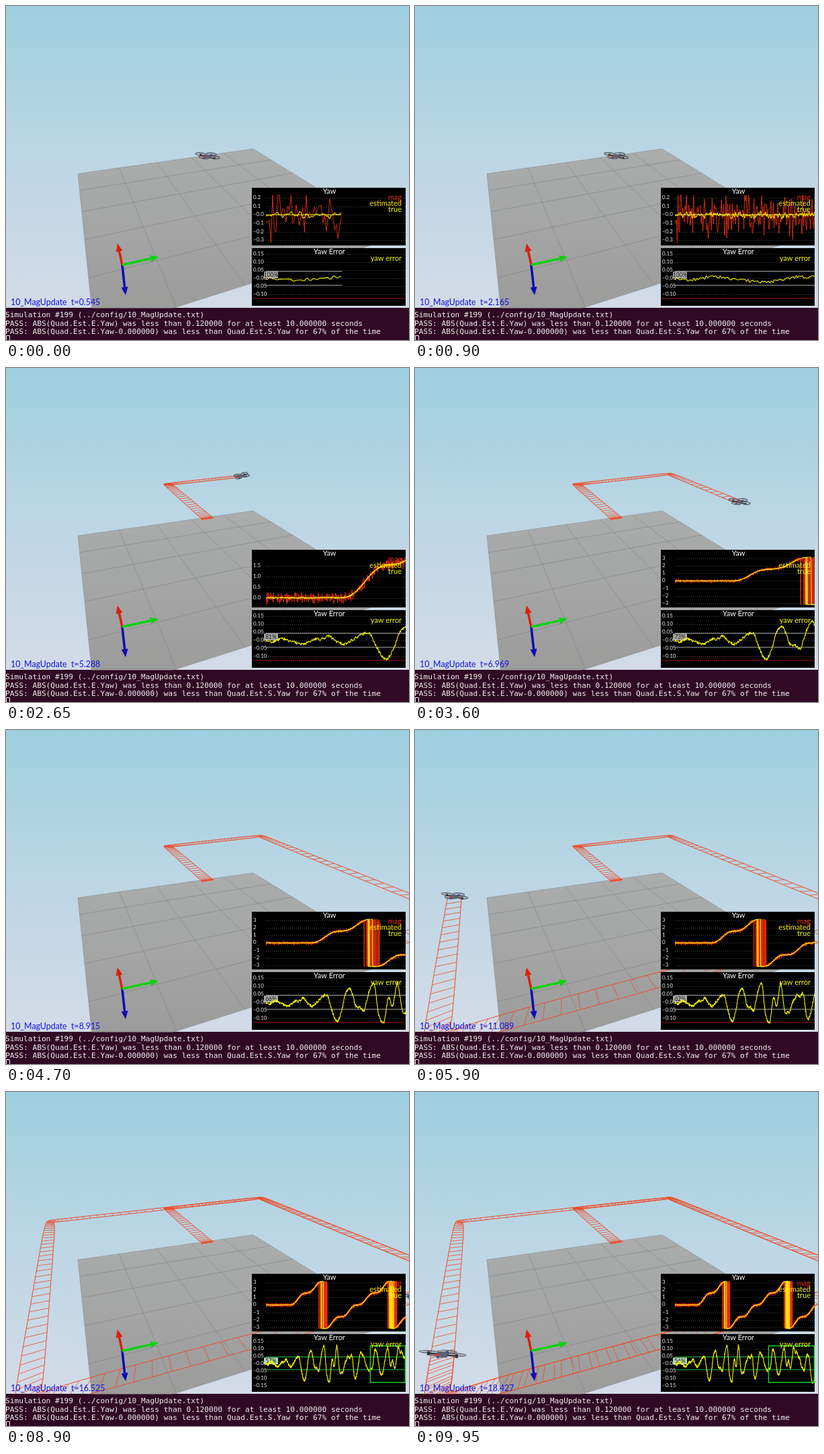
An HTML page with a canvas that plays this animation: 600x498 px, repeating every 10 s.

```html
<!DOCTYPE html>
<html lang="en">
<head>
<meta charset="utf-8">
<title>Yaw estimation simulator</title>
<style>
html, body { margin: 0; width: 100%; height: 100%; overflow: hidden; background: #300a24; }
canvas { display: block; }
</style>
</head>
<body>
<canvas id="stage" width="600" height="498"></canvas>
<script>
const ctx = document.getElementById('stage').getContext('2d');
const LOOP = 10000, STEP = 50, TAU = Math.PI * 2;
const SANS = 'Lato, "Open Sans", sans-serif';
const MONO = '"DejaVu Sans Mono", "Liberation Mono", monospace';

const clamp = p => Math.min(1, Math.max(0, p));
const smooth = p => { p = clamp(p); return p * p * (3 - 2 * p); };
const mix = (a, b, p) => a + (b - a) * p;
const rand = n => { const s = Math.sin(n * 127.1 + 11.7) * 43758.5453; return s - Math.floor(s); };
const gauss = n => (rand(n) + rand(n + .37) + rand(n + .71) - 1.5) * 2;
const wrap = a => a - TAU * Math.round(a / TAU);
const xy = (x, y) => ({ x, y });

// Simulated seconds shown at a given moment of the loop
function simTime(ms) {
  const keys = [[0, .545], [1750, 3.695], [4700, 8.915], [9950, 18.427]];
  const i = keys.findIndex((k, n) => n && ms <= k[0]);
  const [a, b] = [keys[i - 1], keys[i]];
  return mix(a[1], b[1], (ms - a[0]) / (b[0] - a[0]));
}

// Perspective plane: origin plus u and v directions over a shared depth
const plane = (o, du, dv, g, h) => (u, v) => {
  const w = 1 + g * u + h * v;
  return { x: (o[0] + du[0] * u + dv[0] * v) / w, y: (o[1] + du[1] * u + dv[1] * v) / w, w };
};
const air = plane([66, 193], [404.9, 3.3], [-54.4, -24.9], .2425, -.637);
const ground = plane([107, 250], [345.6, 12], [-45.26, -20.72], .23, -.53);

// Out from the centre to the back edge, then around the square
const MIDDLE = .505, LIFT = 2.2, EDGE = 3.5, LEAVE = 3.75, CORNER = 5.95, LEG = 2.01;
const CORNERS = [[1, 0], [1, 1], [0, 1], [0, 0]];
function route(t) {
  if (t < LEAVE) return [MIDDLE, .485 * (1 - smooth((t - LIFT) / (EDGE - LIFT)))];
  if (t < CORNER) return [mix(MIDDLE, 1, smooth((t - LEAVE) / (CORNER - LEAVE))), 0];
  const legs = (t - CORNER) / LEG, n = Math.floor(legs), p = smooth(legs - n);
  const a = CORNERS[n % 4], b = CORNERS[(n + 1) % 4];
  return [mix(a[0], b[0], p), mix(a[1], b[1], p)];
}
function place(t) {
  const near = [-.12, 0, .12].map(d => route(t + d));
  return [0, 1].map(k => near.reduce((sum, p) => sum + p[k] / 3, 0));
}

// Quarter turns with a rest after each
function yawAt(t) {
  const x = Math.max(0, (t - 2.765) / 2.018);
  return Math.PI / 2 * (x - .95 * Math.sin(TAU * x) / TAU);
}

// Wobble that grows once the turning begins
function errorAt(t) {
  const amp = .018 + .066 * smooth((t - 3.1) / 2);
  const swing = Math.cos(TAU * (t - 5.25) / 1.53);
  const n = Math.floor(t / .3), drift = mix(gauss(n + 40), gauss(n + 41), smooth(t / .3 - n));
  return amp * smooth(t / .3) * (swing + drift * .45);
}

const DT = .012, END = 18.6, SIGMA = .043;
const samples = [];
for (let i = 0; i * DT < END; i++) {
  const t = i * DT, yaw = yawAt(t);
  const err = errorAt(t) + (rand(Math.floor(i / 2) + 900) - .5) * .018;
  const noise = Math.max(-.33, Math.min(.23, gauss(i) * .13 - .01));
  samples.push({
    t, err, mag: wrap(yaw + noise), real: wrap(yaw),
    est: wrap(yaw + err * .4 + gauss(i + 5000) * .02)
  });
}

function rung(t) {
  const [u, v] = place(t), yaw = yawAt(t), half = .02;
  const du = Math.cos(yaw) * half, dv = Math.sin(yaw) * half;
  return { t, a: air(u - du, v - dv), b: air(u + du, v + dv) };
}
const rungs = [];
for (let t = 0; t < END; t += .052) rungs.push(rung(t));

function line(points, color, width = 1) {
  ctx.beginPath();
  points.forEach(p => ctx.lineTo(p.x, p.y));
  ctx.strokeStyle = color; ctx.lineWidth = width; ctx.stroke();
}
function poly(points, color) {
  ctx.beginPath();
  points.forEach(p => ctx.lineTo(p.x, p.y));
  ctx.closePath(); ctx.fillStyle = color; ctx.fill();
}
function text(str, x, y, color, size, align = 'left', family = SANS) {
  ctx.font = size + 'px ' + family;
  ctx.textAlign = align; ctx.fillStyle = color;
  ctx.fillText(str, x, y);
}
function rect(x, y, w, h, color) { ctx.fillStyle = color; ctx.fillRect(x, y, w, h); }
function fade(top, bottom, ...colors) {
  const g = ctx.createLinearGradient(0, top, 0, bottom);
  colors.forEach((c, i) => g.addColorStop(i / (colors.length - 1), c));
  return g;
}

function scenery() {
  rect(0, 0, 600, 450, fade(0, 450, '#9dcfe0', '#bcd6e4', '#d3dbe7'));
  poly([ground(0, 0), ground(1, 0), ground(1, 1), ground(0, 1)], fade(213, 450, '#abadad', '#9c9c9b'));
  for (let i = 0; i <= 5; i++) {
    const k = i / 5, shade = 'rgba(105,107,107,.35)';
    line([ground(0, k), ground(1, k)], shade);
    line([ground(k, 0), ground(k, 1)], shade);
  }
}

function trail(t) {
  const past = [...rungs.filter(r => r.t <= t), rung(t)], red = '#ee4c2a';
  line(past.map(r => r.a), red);
  line(past.map(r => r.b), red);
  past.forEach(r => line([r.a, r.b], red, .8));
}

function drone(t) {
  const p = air(...place(t)), size = 31 / p.w, yaw = yawAt(t);
  const squash = .36 * Math.min(1, p.w) - .02;
  ctx.save();
  ctx.translate(p.x, p.y);
  ctx.rotate(.1 - .28 * Math.abs(Math.sin(yaw)));
  for (let k = 0; k < 4; k++) {
    const a = yaw + .45 + k * Math.PI / 2;
    const x = Math.cos(a) * size * .31, y = Math.sin(a) * size * .31 * squash;
    line([xy(0, 0), xy(x, y)], '#34383e', Math.max(1, size * .035));
    ctx.beginPath();
    ctx.ellipse(x, y - size * .03, size * .2, size * .2 * squash, 0, 0, TAU);
    ctx.fillStyle = 'rgba(120,125,130,.35)'; ctx.fill();
    ctx.strokeStyle = 'rgba(45,48,54,.8)'; ctx.lineWidth = 1; ctx.stroke();
    rect(x - size * .03, y - size * .04, size * .06, size * .08, k % 2 ? '#3350a8' : '#303238');
  }
  rect(-size * .1, -size * .06, size * .2, size * .12, '#5a6274');
  rect(-size * .18, -size * .01, size * .14, Math.max(1, size * .03), '#c8452c');
  ctx.restore();
}

function arrow(x, y, color) {
  const o = xy(173, 386), a = Math.atan2(y - o.y, x - o.x), c = Math.cos(a), s = Math.sin(a);
  const neck = xy(x - c * 12, y - s * 12);
  line([o, neck], color, 3.5);
  poly([xy(x, y), xy(neck.x - s * 5, neck.y + c * 5), xy(neck.x + s * 5, neck.y - c * 5)], color);
}

const LEFT = 387, RIGHT = 595;
function panel(y, title, [lo, hi], step, toY) {
  const digits = step < .1 ? 2 : step < 1 ? 1 : 0;
  rect(366, y, 229, 86, '#000');
  for (let i = Math.ceil(lo / step); i <= hi / step; i++) {
    const ty = Math.round(toY(i * step)) + .5;
    ctx.setLineDash([1, 2]);
    line([xy(LEFT, ty), xy(RIGHT, ty)], '#4a4a4a');
    ctx.setLineDash([]);
    const label = (i * step - (step < .5 ? 1e-9 : 0)).toFixed(digits);
    text(label.replace('-', '\u2212'), 368, ty + 1.5, '#f2f2f2', 8);
  }
  text(title, 481.5, y + 9, '#fff', 11, 'center');
}

function plots(t) {
  const data = samples.filter(s => s.t <= t), span = Math.max(1, t);
  const toX = s => LEFT + (RIGHT - LEFT) * s / span;
  const curve = (key, toY, color, width) => line(data.map(s => xy(toX(s.t), toY(s[key]))), color, width);
  ctx.lineJoin = 'bevel';

  let lo = -.32, hi = .22;
  data.forEach(s => { lo = Math.min(lo, s.mag, s.est); hi = Math.max(hi, s.mag, s.est); });
  const size = hi - lo, yawY = v => 353 - 71 * (v - lo) / size;
  panel(271, 'Yaw', [lo, hi], size < .7 ? .1 : size < 2.5 ? .5 : 1, yawY);
  curve('mag', yawY, '#e8300c', .9);
  curve('est', yawY, '#ffd400', 1.1);
  curve('real', yawY, '#f3f52a', 1);
  text('mag', 589, 289, '#f02a10', 11, 'right');
  text('estimated', 589, 298, '#ffe600', 11, 'right');
  text('true', 589, 307, '#f0ff20', 11, 'right');

  const PASS = 12.35, passed = t > PASS;
  const errY = v => passed ? 404.5 - v * 220 : 406 - v * 240;
  panel(361, 'Yaw Error', [passed ? -.151 : -.101, .151], .05, errY);
  const bound = passed ? '#18c832' : '#a8a8a8';
  for (const side of [SIGMA, -SIGMA]) line([xy(LEFT, errY(side)), xy(toX(t), errY(side))], bound);
  if (!passed) line([xy(366, 436), xy(595, 436)], '#a01010');
  const inside = data.filter(s => Math.abs(s.err) < SIGMA).length / data.length;
  rect(384, 396, 21, 10, passed ? '#b4d8b4' : '#a4a4a4');
  text(Math.round(inside * 100) + '%', 394.5, 404, '#181818', 8.5, 'center');
  curve('err', errY, '#f4f400', 1.1);
  if (passed) {
    const x = toX(PASS);
    ctx.strokeStyle = '#14d22c'; ctx.lineWidth = 1.5;
    ctx.strokeRect(x, 378.5, 594.5 - x, 54.5);
  }
  text('yaw error', 589, 379.5, '#ffff10', 11, 'right');
}

function terminal() {
  rect(0, 450.5, 600, 48, '#300a24');
  ['Simulation #199 (../config/10_MagUpdate.txt)',
    'PASS: ABS(Quad.Est.E.Yaw) was less than 0.120000 for at least 10.000000 seconds',
    'PASS: ABS(Quad.Est.E.Yaw-0.000000) was less than Quad.Est.S.Yaw for 67% of the time'
  ].forEach((row, i) => text(row, -1, 464 + i * 12.7, '#f2eff1', 11.2, 'left', MONO));
  ctx.strokeStyle = '#f2eff1'; ctx.lineWidth = 1;
  ctx.strokeRect(.5, 491.5, 5, 7);
}

function draw() {
  const t = simTime(Math.floor(performance.now() % LOOP / STEP) * STEP);
  scenery();
  trail(t);
  drone(t);
  arrow(166, 354, '#dc1e0a');
  arrow(178, 431, '#0a0ab4');
  arrow(227, 374, '#0ad20a');
  text('10_MagUpdate', 7, 446, '#1414e0', 12.4);
  text('t=' + t.toFixed(3), 97, 446, '#1414e0', 12.4);
  plots(t);
  terminal();
  requestAnimationFrame(draw);
}
rungs.length && draw();
</script>
</body>
</html>
```
